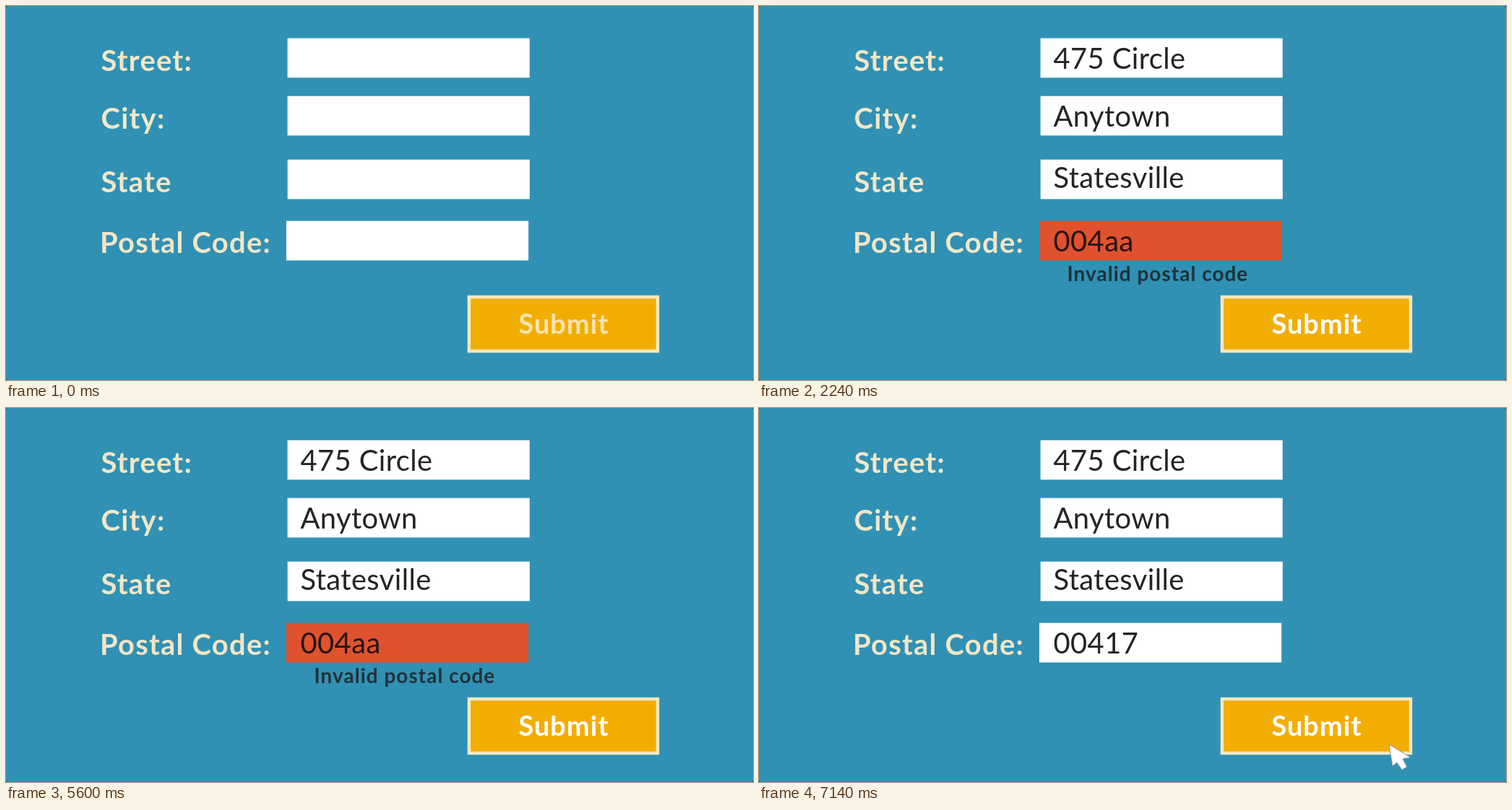
An HTML page for the animation above (7210 ms loop, 1034 by 518 pixels).

```html
<!DOCTYPE html>
<html lang="en">
<head>
<meta charset="utf-8">
<title>Address form</title>
<style>
  html, body { margin: 0; width: 100%; height: 100%; overflow: hidden; background: #17485c; }
  svg { display: block; width: 1034px; height: 518px; }
  text { font: 40px Lato, "Open Sans", sans-serif; letter-spacing: .35px; fill: rgba(20, 16, 17, .92); }
  .label { font-weight: 700; letter-spacing: 1.2px; fill: #f2e6c6; }
  #submit { font-weight: 700; font-size: 38px; letter-spacing: 1px; text-anchor: middle; }
  #message { font-weight: 700; font-size: 28px; letter-spacing: 1px; fill: #20313a; }
</style>
</head>
<body>
<svg viewBox="0 0 1034 518">
  <rect width="1034" height="518" rx="3" fill="#3091b4"/>
  <g id="rows"></g>
  <text id="message" x="426.5" y="381">Invalid postal code</text>
  <rect x="641" y="403" width="261" height="75" fill="#f2ae00" stroke="#f5e8c0" stroke-width="4.5"/>
  <text id="submit" x="772" y="454">Submit</text>
  <path id="cursor" d="M872 466 L877 496 L883 491 L890 501 L897 497 L891 486 L902 484 Z"
        fill="#fff" stroke="#7b8790" stroke-width=".8" stroke-linejoin="round"/>
</svg>
<script>
const LOOP = 7210;
const $ = id => document.getElementById(id);

// Each value is typed from `start`, one character every `pace` ms.
const rows = [
  { label: 'Street:', x: 131.5, y: 90, box: [389.6, 44.6], base: 87, value: '475 Circle', start: 280, pace: 35 },
  { label: 'City:', x: 131.5, y: 170, box: [389.6, 124.7], base: 167, value: 'Anytown', start: 560, pace: 65 },
  { label: 'State', x: 131.5, y: 258, box: [389.7, 212.7], base: 252, value: 'Statesville', start: 820, pace: 40 },
  { label: 'Postal Code:', x: 130, y: 342, box: [388, 297.7], base: 340, value: '004aa', start: 1080, pace: 40 }
];

function add(tag, attrs, text = '') {
  const el = document.createElementNS('http://www.w3.org/2000/svg', tag);
  for (const key in attrs) el.setAttribute(key, attrs[key]);
  el.textContent = text;
  return $('rows').appendChild(el);
}

for (const row of rows) {
  const [x, y] = row.box;
  add('text', { class: 'label', x: row.x, y: row.y }, row.label);
  row.field = add('rect', { x, y, width: 335.2, height: 54.7 });
  row.text = add('text', { x: 407.5, y: row.base });
}
const postal = rows[3];

const ramp = (t, from, to) => Math.min(1, Math.max(0, (t - from) / (to - from)));

function mix(a, b, k) {
  return `rgb(${a.map((v, i) => Math.round(v + (b[i] - v) * k))})`;
}

function typed({ value, start, pace }, t) {
  return value.slice(0, Math.max(0, Math.floor((t - start) / pace) + 1));
}

function corrected(t) {
  if (t < 6230) return '004a';
  return '00417'.slice(0, t < 6370 ? 3 : t < 6510 ? 4 : 5);
}

function draw(t) {
  for (const row of rows) {
    row.text.textContent = typed(row, t);
    row.field.style.fill = '#fff';
  }
  if (t >= 6090) postal.text.textContent = corrected(t);

  const error = ramp(t, 1230, 1320) - ramp(t, 6720, 6790);
  postal.field.style.fill = mix([255, 255, 255], [224, 82, 46], error);
  $('message').style.opacity = error;
  $('submit').style.fill = mix([248, 227, 176], [255, 255, 255], ramp(t, 280, 490));
  $('cursor').style.visibility = t >= 7070 ? 'visible' : 'hidden';
}

const began = performance.now();
function tick() {
  draw((performance.now() - began) % LOOP);
  requestAnimationFrame(tick);
}
tick();
</script>
</body>
</html>
```
